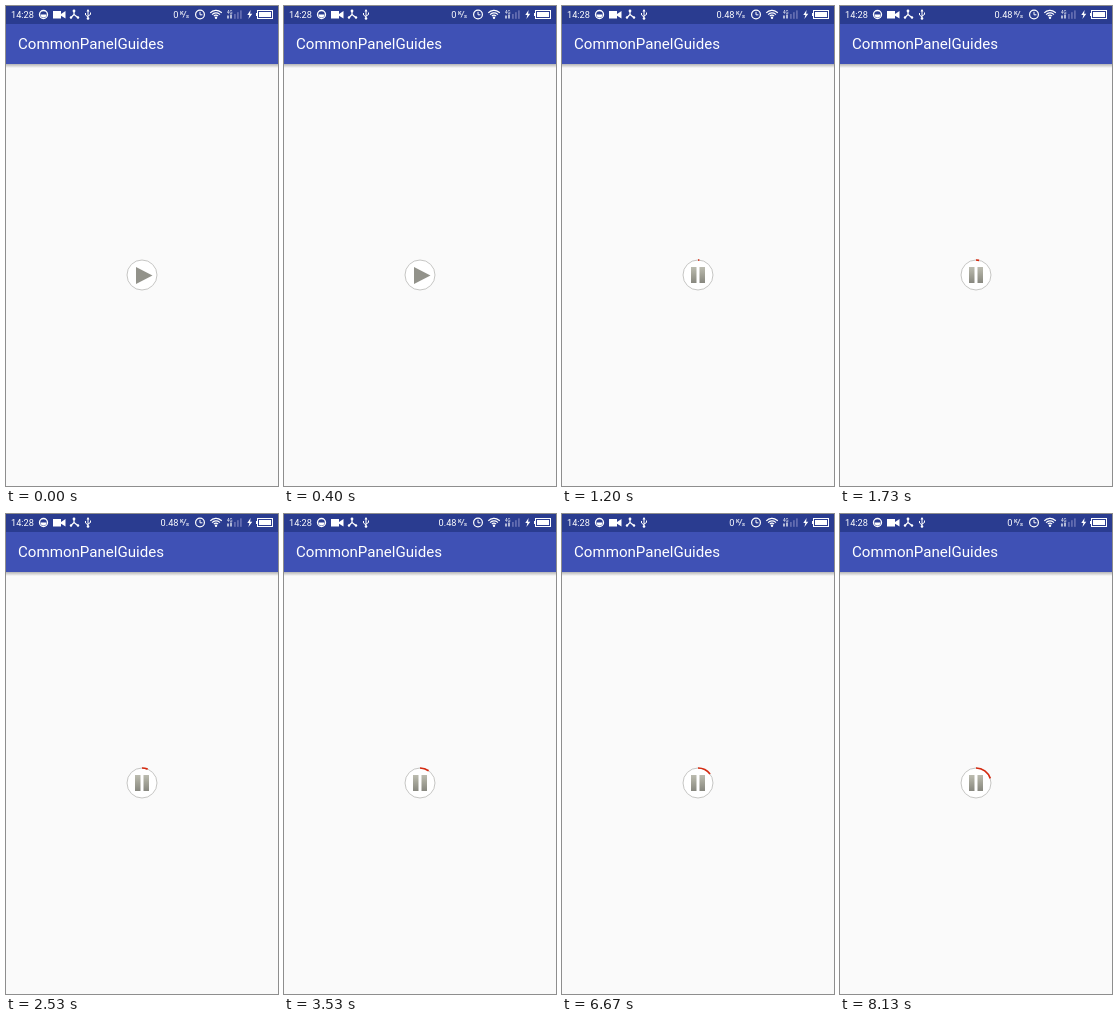
Recreate the animation shown at these times as an HTML page with a canvas. Size 272 by 480 pixels, loop 8.19 s.

```html
<!DOCTYPE html>
<html lang="en">
<head>
<meta charset="utf-8">
<title>Player button</title>
<style>
  html, body { margin: 0; width: 100%; height: 100%; overflow: hidden; background: #fafafa; }
  canvas { display: block; width: 272px; height: 480px; }
</style>
</head>
<body>
<canvas id="stage"></canvas>
<script>
const W = 272, H = 480, LOOP = 8190;
const START = 800, PAUSE = 4030, IDLE = 4400, RESUME = 5730;
const SPEED_ON = 930;
const DEG_PER_MS = 0.0128;
const CX = 136, CY = 269, R = 15;
const FONT = 'Roboto, "Noto Sans", sans-serif';
const PAPER = '#fafafa';

const canvas = document.getElementById('stage');
const ctx = canvas.getContext('2d');
const dpr = window.devicePixelRatio || 1;
canvas.width = W * dpr;
canvas.height = H * dpr;
ctx.scale(dpr, dpr);

function rect(x, y, w, h, color) {
  ctx.fillStyle = color;
  ctx.fillRect(x, y, w, h);
}

function text(str, x, y, size, align = 'left', weight = 400) {
  ctx.font = `${weight} ${size}px ${FONT}`;
  ctx.fillStyle = '#fff';
  ctx.textAlign = align;
  ctx.fillText(str, x, y);
}

function poly(points, color = '#fff') {
  ctx.beginPath();
  points.forEach(([x, y]) => ctx.lineTo(x, y));
  ctx.closePath();
  ctx.fillStyle = color;
  ctx.fill();
}

function line(points, width = 1) {
  ctx.beginPath();
  points.forEach(([x, y]) => ctx.lineTo(x, y));
  ctx.lineWidth = width;
  ctx.strokeStyle = '#fff';
  ctx.stroke();
}

function arc(x, y, r, from, to, width, color = '#fff') {
  ctx.beginPath();
  ctx.arc(x, y, r, from, to);
  ctx.lineWidth = width;
  ctx.strokeStyle = color;
  ctx.stroke();
}

function dot(x, y, r, color = '#fff', to = Math.PI * 2) {
  ctx.beginPath();
  ctx.arc(x, y, r, 0, to);
  ctx.fillStyle = color;
  ctx.fill();
}

function leftIcons() {
  arc(37.5, 8.5, 4, 0, Math.PI * 2, 1.3);
  dot(37.5, 8.5, 3, '#fff', Math.PI);

  rect(47, 5, 8, 7.5, '#fff');
  poly([[55, 8], [59.5, 5], [59.5, 12.5], [55, 9.8]]);

  line([[68, 4.5], [68, 8.5], [64.5, 12]], 1.2);
  line([[68, 8.5], [72.5, 12]], 1.2);
  dot(68, 5, 1.4);
  dot(65, 11.5, 1.2);
  dot(72, 11.5, 1.2);

  line([[82, 4], [82, 13]]);
  line([[79.5, 7], [79.5, 9], [82, 11]]);
  line([[84.5, 6.5], [84.5, 8.5], [82, 10]]);
  poly([[80.5, 5.5], [82, 3], [83.5, 5.5]]);
  dot(82, 12.5, 1.3);
}

function rightIcons() {
  arc(194, 8.5, 4.4, 0, Math.PI * 2, 1.2);
  line([[194, 5.8], [194, 8.8], [196.4, 8.8]]);

  for (const r of [2.8, 5.2, 7.6]) arc(210, 12, r, -Math.PI * 0.77, -Math.PI * 0.23, 1.2);
  dot(210, 11.8, 1.2);

  text('4G', 221, 7.5, 4.5);
  line([[222, 12.5], [222, 9.5]], 1.3);
  line([[225, 12.5], [225, 8.5]], 1.3);
  for (let i = 0; i < 3; i++) rect(228 + i * 3, 8 - i * 1.8, 1.8, 4.8 + i * 1.8, '#626cb0');

  poly([[244.6, 4], [241.3, 9], [243.4, 9], [242.4, 13], [246.3, 7.7], [244.1, 7.7]]);

  ctx.strokeStyle = '#fff';
  ctx.lineWidth = 1;
  ctx.strokeRect(251.5, 4.5, 15, 8);
  rect(253, 6, 12, 5, '#fff');
  rect(250, 7, 1.2, 3, '#fff');
}

function header(speed) {
  rect(0, 0, W, 18, '#2a3c90');
  rect(0, 18, W, 40, '#3f51b5');
  const shadow = ctx.createLinearGradient(0, 58, 0, 62);
  shadow.addColorStop(0, 'rgba(0,0,0,.28)');
  shadow.addColorStop(1, 'rgba(0,0,0,0)');
  rect(0, 58, W, 4, shadow);

  text('14:28', 5, 12, 9.2);
  leftIcons();
  text(speed, 172.5, 12, 9.2, 'right');
  text('K', 174, 8.7, 5.8, 'left', 500);
  line([[177, 11.5], [180, 5]], 0.8);
  text('s', 180, 11.8, 5.8, 'left', 500);
  rightIcons();
  text('CommonPanelGuides', 12, 43, 15.1);
}

function button(playing, degrees) {
  dot(CX, CY, R, '#fff');
  arc(CX, CY, R, 0, Math.PI * 2, 1, '#c6c6c4');

  const fill = ctx.createLinearGradient(0, 261, 0, 278);
  fill.addColorStop(0, '#bcbcb0');
  fill.addColorStop(0.4, '#a6a69a');
  fill.addColorStop(1, '#84847c');
  if (playing) {
    rect(129, 261, 5.5, 16, fill);
    rect(137.5, 261, 5.5, 16, fill);
  } else {
    poly([[130, 261], [146.5, 269.5], [130, 278]], '#92928a');
  }

  if (degrees) {
    const top = -Math.PI / 2;
    arc(CX, CY, R, top, top + degrees * Math.PI / 180, 1.7, '#d62a10');
  }
}

const span = (t, from, to) => Math.max(0, Math.min(t, to) - from);

function draw(t) {
  const playing = (t >= START && t < PAUSE) || t >= RESUME;
  const played = span(t, START, PAUSE) + span(t, RESUME, LOOP);
  const speed = t >= SPEED_ON && t < IDLE ? '0.48' : '0';
  rect(0, 0, W, H, PAPER);
  header(speed);
  button(playing, played * DEG_PER_MS);
}

const origin = performance.now();
function frame() {
  draw((performance.now() - origin) % LOOP);
  requestAnimationFrame(frame);
}
frame();
</script>
</body>
</html>
```
